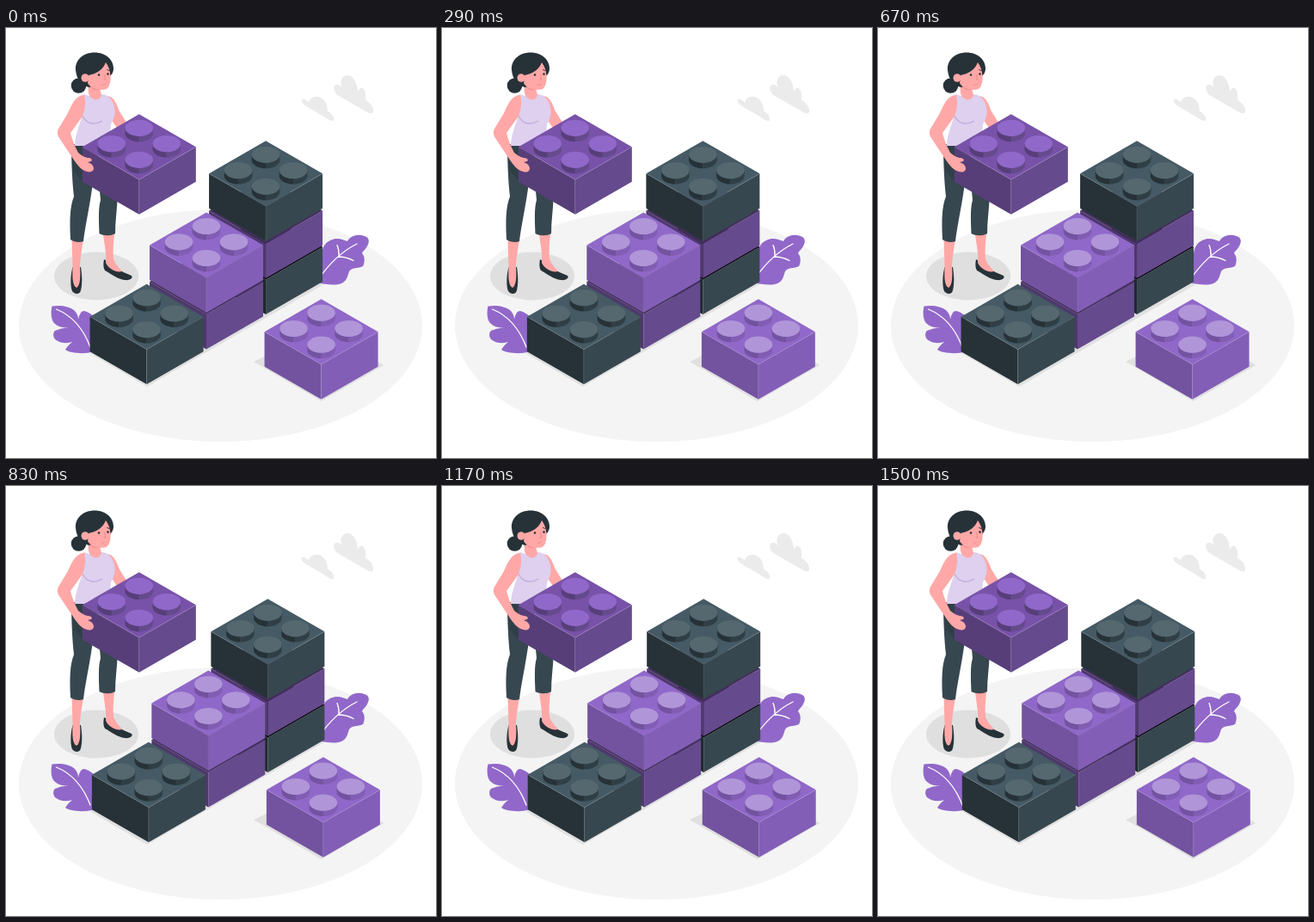
Recreate the animation shown at these times as an HTML page. Size 500 by 500 pixels, loop 1540 ms.

```html
<!DOCTYPE html>
<html lang="en">
<head>
<meta charset="utf-8">
<title>Building blocks</title>
<style>
html, body { margin: 0; width: 100%; height: 100%; overflow: hidden; background: #fff; }
svg { display: block; width: 100%; height: 100%; }
</style>
</head>
<body>
<svg viewBox="0 0 500 500" xmlns="http://www.w3.org/2000/svg">
  <ellipse cx="249.5" cy="346" rx="234.5" ry="135" fill="#f4f4f4"/>
  <ellipse cx="105" cy="288.5" rx="49" ry="28" fill="#dfdfdf"/>
  <g fill="#e0e0e0">
    <path d="M97 378L164 417L373 296L340 280Z"/>
    <path d="M288 388L366.500 434L439.500 392L366 350Z"/>
  </g>
  <g fill="#ebebeb">
    <path d="M382 67C385 64 389 67 391 70C387 62 391 54 398 55C405 56 409 66 409 74C412 67 417 69 418 76L418 84C423 86 428 92 427 98C425 101 420 98 415 95L387 79C382 76 380 70 382 67Z"/>
    <path d="M343.500 83C346 82 350 84 352 87C353 81 360 78 366 81C372 84 374 91 374 97C378 98 382 103 381 108C378 109 372 105 368 102L349 91C346 89 343 86 343.500 83Z"/>
  </g>

  <g id="leaves" fill="#9168c9">
    <path d="M362 296C361 283 364 274 367 269C366 260 369 250 377 247C385 243 391 246 397 248C400 242 407 240 413 241C420 242 423 245 421.500 250C420 256 415 259 414 262C418 266 417 274 415 277C409 280 402 278 399 283C397 288 397 294 390 297C382 300 372 298 362 296Z"/>
    <path d="M53.500 323.500C62 322 74 323 80 329C83 332 84 336 84 339C85 334 87 329 91 329C95 330 98 332 102 335L102 376C92 380 74 378 69 374C72 369 76 365 81 363C73 368 63 367 57 362C54 358 55 354 57 352C63 349 71 348 76 349C66 349 57 347 54 340C52 334 52.500 328 53.500 323.500Z"/>
    <g fill="none" stroke="#fff" stroke-width="1.300" stroke-linecap="round">
      <path d="M364 291C376 274 390 260 408 251M386 266Q396 266 404 270.500M387 265Q387.500 258 385 252.500"/>
      <path d="M58.500 327C76 334 90 350 98 371"/>
    </g>
  </g>

  <g id="woman">
    <path d="M114 269C113 274 113 279 115 282C124 287 130 292 138 293C145 294 148 290 146 288C140 285 133 284 128 277Z" fill="#263238"/>
    <path d="M77.500 278C75 287 74.500 300 77 306C80 310 86 310 87 305C89 297 88.500 287 87 278Z" fill="#263238"/>
    <g fill="#ffa8a7">
      <path d="M113 239L126 239C125 250 124 260 125 268C127 275 132 279 135 283C129 285 119 280 116 273C117 262 114 250 113 239Z"/>
      <path d="M76.500 246L90 246C88 258 86 270 86 278C87 290 86 300 82 302C77 300 77 288 77.500 278Z"/>
      <path d="M117 79C126 79 129 90 132 97L142 113L130 118L121 104Z"/>
    </g>
    <path d="M107 170L110 200C107 210 108 225 108.500 239C114 242 122 242 127 239C127 225 129 212 129.500 200L130 180Z" fill="#37474f"/>
    <path d="M76 135C76 155 77 180 79 196C74 208 74 225 75 246C79 249 86 250 90 248C92 230 97 210 101 180L107 150L104 135Z" fill="#37474f"/>
    <path d="M76 136C76 147 77 157 78 166L96 185L92 138Z" fill="#263238" opacity=".35"/>
    <path d="M91 77C97 80 106 80 111 77C118 77 123 82 125.500 90C128 99 126 105 122 112L120 137L80 137C80 125 85 115 88 104C87 95 88 84 91 77Z" fill="#ded0ee"/>
    <path d="M89 102C93 111 102 114 112 108" fill="none" stroke="#bfa9d9" stroke-width="1.200"/>
    <path d="M95 64L96 76C99 85 109 86 111 78L108 66Z" fill="#ffa8a7"/>
    <path d="M98 68C101 73 106 73 109 71L108.500 67Z" fill="#f28f8f"/>
    <circle cx="84.500" cy="67" r="8.800" fill="#263238"/>
    <path d="M81 49C80 37 90 28.500 103 28.500C116 28.500 125 37 125 47C125 52 122 56 118 58L97 69C87 67 82 59 81 49Z" fill="#263238"/>
    <path d="M96 55C106 53 113 48 116 40C119 44 121 49 121.500 55C122 63 120 71 115 71.500C106 73 97 69 95 64Z" fill="#ffa8a7"/>
    <path d="M118 38C123 39 125 44 124 51L121 53C121 47 120 42 118 38Z" fill="#263238"/>
    <ellipse cx="92" cy="58" rx="4.500" ry="4.800" fill="#ffa8a7"/>
    <g fill="#263238"><circle cx="108" cy="54.500" r="1.300"/><circle cx="118.500" cy="53.500" r="1.300"/></g>
    <g fill="none" stroke-linecap="round">
      <path d="M104.500 51L108 49M117.500 48.500L120 49.500" stroke="#263238" stroke-width=".9"/>
      <path d="M114.500 54L115.500 60L113.500 60M111 66Q113 67 115 65.500" stroke="#ed8585" stroke-width=".9"/>
    </g>
  </g>
  <g id="held"></g>
  <path d="M91 77.500C80 79 76 90 72 99L60.500 118C59 122 60 125 62 128L80 155C85 162 90 167 97 167.500C103 167 103.500 162 99 158L95 156L99 155C101 153 99 151 95 151C90 150 87 147 84 145C80 138 77 130 75 122L88 104C92 96 93 88 91 77.500Z" fill="#ffa8a7"/>
  <g id="stack"></g>
</svg>

<script>
const SLATE = { left: "#263238", right: "#37474f", top: "#455a64", cap: "#55686f", rim: ["#263238", "#303f46"] };
const LILAC = { left: "#7353a0", right: "#835eb6", top: "#9068c9", cap: "#b095d8", rim: ["#7353a0", "#815db3"] };
const PLUM = { left: "#573e79", right: "#654a8d", top: "#7852a9", cap: "#9068c9", rim: ["#573e79", "#654a8d"] };
const UNDER = { left: "#4e386d", right: "#654a8d", top: "#432f5e" };
const BASE = { left: "#20292e", right: "#37474f", top: "#000" };
const W = 66, H = 38, TALL = 40.5;

const poly = (fill, ...pts) => `<path d="M${pts.map(p => p.join(" ")).join("L")}Z" fill="${fill}"/>`;

function stud(x, y, c) {
  const rx = 16.3, ry = 9.6, h = 6.3;
  const side = (dir, fill) =>
    `<path d="M${x} ${y}h${dir * rx}v${h}A${rx} ${ry} 0 0 ${dir > 0 ? 1 : 0} ${x} ${y + h + ry}Z" fill="${fill}"/>`;
  return side(-1, c.rim[0]) + side(1, c.rim[1]) +
    `<ellipse cx="${x}" cy="${y}" rx="${rx}" ry="${ry}" fill="${c.cap}"/>`;
}

// x, y: centre of the top face
function brick(x, y, c) {
  const l = [x - W, y], r = [x + W, y], b = [x, y + H];
  const down = p => [p[0], p[1] + TALL];
  let s = poly(c.left, l, b, down(b), down(l)) +
    poly(c.right, r, b, down(b), down(r)) +
    poly(c.top, l, [x, y - H], r, b);
  if (!c.cap) return s;
  s += `<path d="M${l}L${b}L${r}M${b}V${y + H + TALL}" fill="none" stroke="#fff" stroke-opacity=".13" stroke-width=".8"/>`;
  for (const [dx, dy] of [[0, -22], [-32, -3.7], [32, -3.7], [0, 15]]) s += stud(x + dx, y + dy, c);
  return s;
}

const stack = document.getElementById("stack");
document.getElementById("held").innerHTML = brick(154.8, 138.3, PLUM);
stack.innerHTML = [
  [302.3, 254.5, BASE], [302.3, 212.5, UNDER], [302.3, 169.3, SLATE],
  [233.2, 295, UNDER], [233.2, 252.5, LILAC],
  [163.8, 335.7, SLATE], [366.8, 353.2, LILAC]
].map(a => brick(...a)).join("");

// Sideways shake: one key every 150 ms, shown at 24 steps a second
const KEYS = [0, -1, 2, -4, 4, -4, 4, -4, 2, -1, 0, 0];
const LOOP = 1540, STEP = 1000 / 24, LEAD = 31;

function shake(t) {
  const step = Math.floor((t + 5) / STEP);
  const p = (step * STEP + LEAD) / 150, i = Math.min(Math.floor(p), 10);
  return KEYS[i] + (KEYS[i + 1] - KEYS[i]) * (p - i);
}

function draw(t) {
  stack.setAttribute("transform", `translate(${shake(t).toFixed(3)} 0)`);
}

const start = performance.now();
function tick() {
  draw((performance.now() - start) % LOOP);
  requestAnimationFrame(tick);
}
draw(0);
requestAnimationFrame(tick);
</script>
</body>
</html>
```
